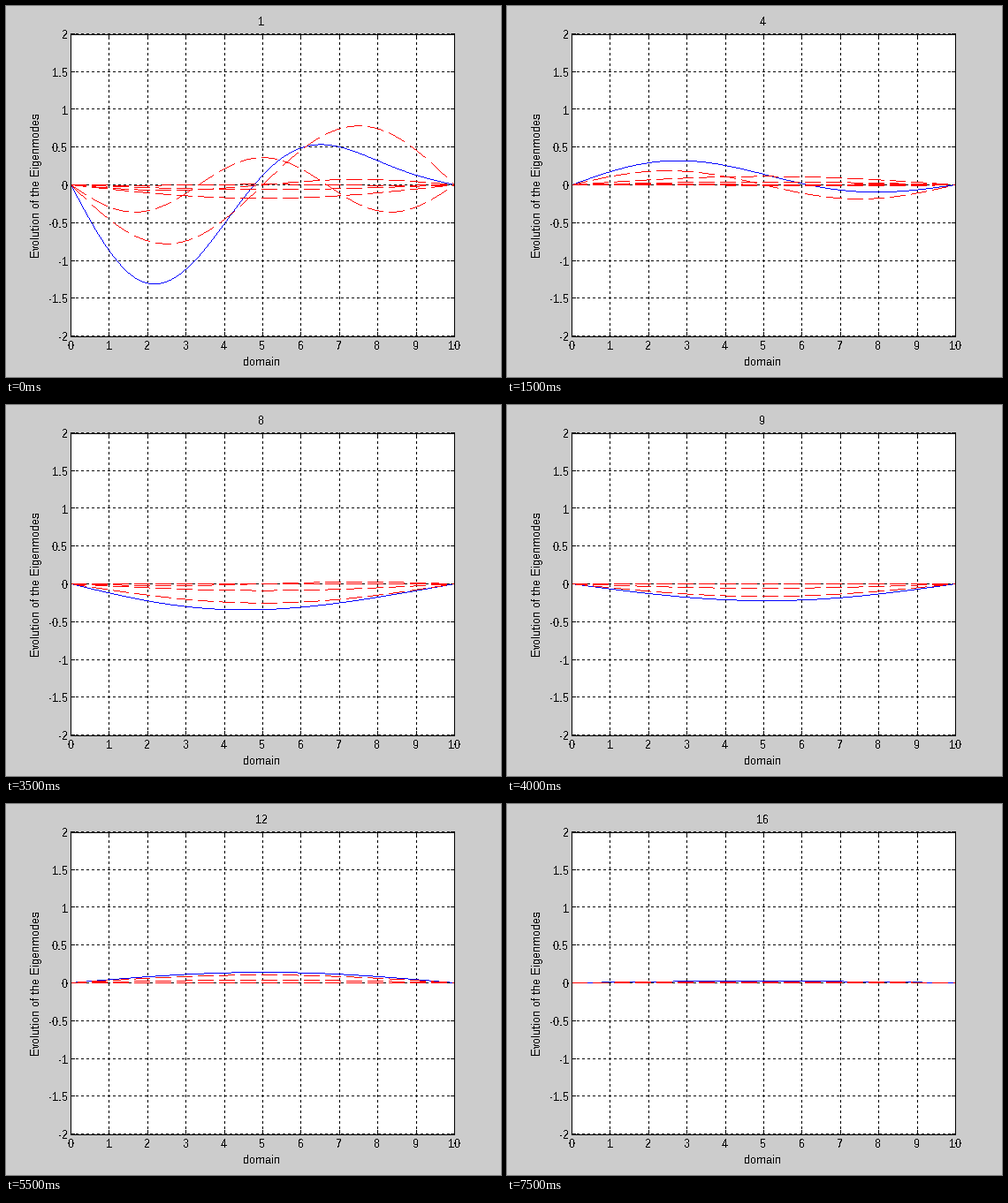
Write a matplotlib script that moves like this. It is 560 px wide and 420 px high and loops after 8000 ms.

```python
import numpy as np
import matplotlib.pyplot as plt
from matplotlib.animation import FuncAnimation

W, H, DPI = 560, 420, 80
PX = 72 / DPI  # one pixel in points
LEFT, RIGHT, TOP, BOTTOM = 73, 507, 32, 374
SX, SY = (RIGHT - LEFT) / 10, (BOTTOM - TOP) / 4  # pixels per data unit
STEPS, STEP_MS = 16, 500
DOTTED, DASHED = (3, 3), (18, 6)

plt.rcParams.update({
    "font.family": "Liberation Sans",
    "font.size": 13 * PX,
    "text.antialiased": False,
    "text.hinting": "native",
    "text.hinting_factor": 1,
    "toolbar": "None",
})

# Damped modes: amplitude, decay per step, turn per step, start angle, main share
MODES = [
    (1.25, 0.855, 60.0, -167.0, 0.742),
    (1.69, 0.61, 61.6, -124.2, 0.915),
    (4.20, 0.30, 60.0, -163.0, 0.98),
]

x = np.linspace(0, 10, 101)
y_marks = np.arange(-2, 2.1, 0.5)

fig = plt.figure(figsize=(W / DPI, H / DPI), dpi=DPI, facecolor="#cccccc")
ax = fig.add_axes([LEFT / W, 1 - BOTTOM / H, (RIGHT - LEFT) / W, (BOTTOM - TOP) / H])
ax.set(xlim=(0, 10), ylim=(-2, 2), xticks=[], yticks=[])
for spine in ax.spines.values():
    spine.set_linewidth(PX)


def trace(xs, ys, dash=(1, 0)):
    """Walk a polyline pixel by pixel and return the inked pixels in data units."""
    cols, rows = np.multiply(xs, SX), np.multiply(ys, SY)
    steps = np.maximum(abs(np.diff(cols)), abs(np.diff(rows)))
    dist = np.concatenate([[0], np.cumsum(steps)])
    walk = np.arange(round(dist[-1]) + 1)
    walk = walk[walk % sum(dash) < dash[0]]
    return (np.rint(np.interp(walk, dist, cols)) / SX,
            np.rint(np.interp(walk, dist, rows)) / SY)


def ink(xs, ys, color="black", dash=(1, 0)):
    line, = ax.plot(*trace(xs, ys, dash), ",", color=color, clip_on=False)
    return line


def label(px, py, text, **kw):
    kw = {"ha": "center", "va": "baseline", **kw}
    return fig.text(px / W, 1 - py / H, text, **kw)


tick_x, tick_y = 4 / SX, 4 / SY
for k in range(11):
    ink([k, k], [-2, 2], dash=DOTTED)
    ink([k, k], [-2, -2 + tick_y])
    ink([k, k], [2 - tick_y, 2])
    label(LEFT + SX * k, 389, str(k))
for v in y_marks:
    ink([0, 10], [v, v], dash=DOTTED)
    ink([0, tick_x], [v, v])
    ink([10 - tick_x, 10], [v, v])
    label(70, TOP + SY * (2 - v) + 5, f"{v:g}", ha="right")
label(289, 407, "domain")
label(38, 203, "Evolution of the Eigenmodes", rotation=90, rotation_mode="anchor")
title = label(289, 22, "1")

total = ink(x, 0 * x, "blue")
parts = [ink(x, 0 * x, "red", DASHED) for _ in range(2 * len(MODES))]


def mode_curve(n, step):
    amp, decay, turn, start, _ = MODES[n]
    angle = np.radians(start + turn * (step - 1))
    return amp * decay**step * np.sin(angle) * np.sin((n + 1) * np.pi * x / 10)


def update(i):
    step = i + 1
    curves = [mode_curve(n, step) for n in range(len(MODES))]
    for n, curve in enumerate(curves):
        share = MODES[n][4]
        parts[2 * n].set_data(*trace(x, share * curve, DASHED))
        parts[2 * n + 1].set_data(*trace(x, (1 - share) * curve, DASHED))
    total.set_data(*trace(x, sum(curves)))
    title.set_text(str(step))
    return [total, title, *parts]


anim = FuncAnimation(fig, update, frames=STEPS, interval=STEP_MS,
                     repeat=True, repeat_delay=0, blit=False)
plt.show()
```
